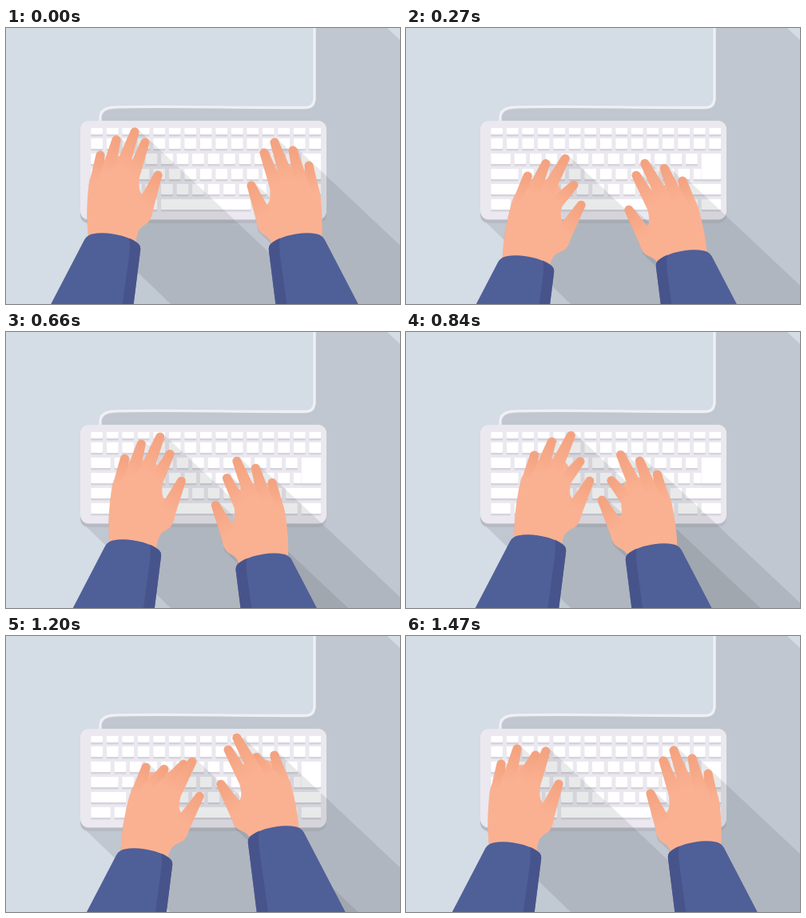
Write an HTML page that moves like this. It is 493x345 px and loops after 1500 ms.

```html
<!DOCTYPE html>
<html lang="en">
<head>
<meta charset="utf-8">
<title>Typing hands</title>
<style>
html, body { margin: 0; width: 100%; height: 100%; overflow: hidden; background: #d4dce5; }
svg { display: block; width: 493px; height: 345px; }
</style>
</head>
<body>
<svg id="stage" viewBox="0 0 493 345" xmlns="http://www.w3.org/2000/svg">
  <defs id="defs"></defs>
  <rect width="493" height="345" fill="#d4dce5"/>
  <path fill="#c1c7d0" d="M386 0V88Q386 100 374 100H132Q118 101 118 116V200L96 239L206 345H493V15L477 0Z"/>
  <path fill="none" stroke="#f0eff4" stroke-width="3.4" d="M386 -3V87Q386 99.500 374 99.500C290 100 200 97 136 99Q118 100 118 112V120"/>
  <rect x="93" y="122" width="308" height="122" rx="10" fill="#b7bac4"/>
  <rect x="93" y="116" width="308" height="123.500" rx="10" fill="#ebe8ef"/>
  <g id="keys"></g>
  <g id="shade" fill="#14161c"></g>
  <g id="hands"></g>
</svg>
<script>
const LOOP = 1500, STEP = 30;
const MIRROR = 497;          // x of the right hand = MIRROR - x
const DIR = [500, 470];      // direction of the cast shadows
const WRIST = [132, 265];
const FOLD = 18;             // how far a pressing fingertip is drawn in

// shared beats of both hands
const BEATS = [
  { at: 0, turn: 0, reach: 0 },
  { at: 270, turn: 0.16, reach: 1 },
  { at: 510, turn: 0, reach: 5 },
  { at: 840, turn: 0.1, reach: 1 },
  { at: 960, turn: 0.04, reach: 4 },
  { at: 1200, turn: 0.16, reach: 3 },
  { at: 1470, turn: 0, reach: 0 }
];
// inward and downward shift at each beat, and the fingers that press
const LEFT = [[0, 0], [17, 28, "index"], [22, 12], [32, -3, "index"],
  [40, 5, "middle"], [40, 9, "ring middle"], [1, 1, "middle"]];
const RIGHT = [[0, 0], [16, 21], [27, 25], [54, 8, "index"],
  [42, -5, "middle"], [26, -19, "ring"], [1, 0]];

// left hand at rest
const FINGERS = [
  { name: "little", tip: [118, 159], base: [113, 196], r: 9 },
  { name: "ring", tip: [138, 140], base: [126, 187], r: 9.5 },
  { name: "middle", tip: [161, 130], base: [142, 184], r: 9.5 },
  { name: "index", tip: [174, 143], base: [157, 189], r: 9 },
  { name: "thumb", tip: [190, 184], base: [173, 226], r: 11 }
];
const PALM = [[104, 295], [103, 262], [101, 238], [102, 212], [104, 190], [112, 172], [128, 163], [145, 159],
  [161, 164], [167, 184], [166, 203], [174, 212], [185, 224], [181, 242], [166, 250], [162, 268], [161, 295]];

const svgNS = "http://www.w3.org/2000/svg";
const byId = id => document.getElementById(id);
function add(parent, tag, attrs) {
  const el = document.createElementNS(svgNS, tag);
  for (const k in attrs) el.setAttribute(k, attrs[k]);
  parent.appendChild(el);
  return el;
}

// every row is 15 units wide
function drawKeys() {
  const unit = 19.5, gap = 4.7, box = byId("keys");
  const row = (y, widths, h = 13, lastH = h) => {
    let x = 106.3;
    widths.forEach((w, i) => {
      const height = i === widths.length - 1 ? lastH : h, width = w * unit - gap;
      add(box, "rect", { x, y: y + 2.5, width, height, rx: 1, fill: "#d6d3dd" });
      add(box, "rect", { x, y, width, height, rx: 1, fill: "#fff" });
      x += w * unit;
    });
  };
  const ends = (w, n) => [w, ...Array(n).fill(1), w];
  row(125, ends(1, 13), 8);
  row(138, ends(1, 13));
  row(176, ends(2, 11));
  row(157, ends(1.5, 12), 13, 32);
  row(195, ends(2.5, 10));
  row(214, [1.5, 1, 2, 6, 1.5, 1.5, 1.5]);
}

// smooth cyclic interpolation that never overshoots a pose
function sample(poses, t) {
  const n = BEATS.length;
  const when = i => BEATS[(i + n) % n].at + LOOP * Math.floor(i / n);
  const pose = i => poses[(i + n) % n];
  let i = n - 1;
  while (BEATS[i].at > t) i--;
  const slope = (j, c) => (pose(j + 1)[c] - pose(j)[c]) / (when(j + 1) - when(j));
  const tangent = (j, c) => {
    const a = slope(j - 1, c), b = slope(j, c);
    return a * b > 0 ? 2 * a * b / (a + b) : 0;
  };
  const d = when(i + 1) - when(i), u = (t - when(i)) / d, v = 1 - u;
  return pose(i).map((p, c) =>
    p * v * v * (1 + 2 * u) + pose(i + 1)[c] * u * u * (3 - 2 * u) +
    d * u * v * (v * tangent(i, c) - u * tangent(i + 1, c)));
}

const pt = p => p[0].toFixed(2) + " " + p[1].toFixed(2);
const poly = pts => "M" + pts.map(pt).join("L") + "Z";
const mid = (a, b) => [(a[0] + b[0]) / 2, (a[1] + b[1]) / 2];
function smooth(pts) {
  const n = pts.length;
  return "M" + pt(mid(pts[n - 1], pts[0])) +
    pts.map((p, i) => "Q" + pt(p) + " " + pt(mid(p, pts[(i + 1) % n]))).join("") + "Z";
}

// tapered finger with rounded ends
function taper(base, tip, r0, r1) {
  const a = Math.atan2(tip[1] - base[1], tip[0] - base[0]), pts = [];
  const arc = (c, r, from) => {
    for (let i = 0; i <= 12; i++) {
      const g = from + i * Math.PI / 12;
      pts.push([c[0] + r * Math.cos(g), c[1] + r * Math.sin(g)]);
    }
  };
  arc(tip, r1, a - Math.PI / 2);
  arc(base, r0, a + Math.PI / 2);
  return pts;
}

// area swept by an outline along DIR
function sweep(pts) {
  const move = p => [p[0] + DIR[0], p[1] + DIR[1]];
  return pts.map((p, i) => {
    const q = pts[(i + 1) % pts.length];
    const flip = (q[0] - p[0]) * DIR[1] < (q[1] - p[1]) * DIR[0];
    const [a, b] = flip ? [q, p] : [p, q];
    return poly([a, b, move(b), move(a)]);
  }).join("");
}

function makeHand(side, moves, mirror, low) {
  const fx = p => mirror ? [MIRROR - p[0], p[1]] : p;
  const poses = moves.map(([x, y, press = ""], i) => [x, y, BEATS[i].turn, BEATS[i].reach - low,
    ...FINGERS.map(f => press.includes(f.name) ? FOLD : 0)]);

  const shade = add(byId("shade"), "path", { opacity: 0.095 });
  const box = add(byId("hands"), "g", {});
  const palm = add(box, "path", { fill: "#fab192" });
  const fingers = FINGERS.map(f => {
    const id = side + f.name;
    const grad = add(byId("defs"), "linearGradient", { id, gradientUnits: "userSpaceOnUse" });
    add(grad, "stop", { offset: 0, "stop-color": "#f4a380" });
    add(grad, "stop", { offset: 0.9, "stop-color": "#fab192" });
    return { ...f, grad, path: add(box, "path", { fill: `url(#${id})` }) };
  });
  const sleeve = add(box, "path", { fill: "#4f5f98" });
  const fold = add(box, "path", { fill: "#445189", opacity: 0.75 });

  return t => {
    const [dx, dy, turn, reach, ...press] = sample(poses, t);
    const sin = Math.sin(turn), cos = Math.cos(turn);
    const place = p => {
      const x = p[0] - WRIST[0], y = p[1] - WRIST[1];
      return [WRIST[0] + dx + x * cos - y * sin, WRIST[1] + dy - reach + x * sin + y * cos];
    };

    const outline = PALM.map(p => fx(place(p)));
    palm.setAttribute("d", smooth(outline));
    let cast = sweep(outline);
    fingers.forEach((f, i) => {
      const [x, y] = place(f.tip);
      const a = fx(place(f.base)), b = fx([x, y + press[i]]);
      const pts = taper(a, b, f.r, 5.5);
      f.path.setAttribute("d", poly(pts));
      [["x1", b[0]], ["y1", b[1]], ["x2", a[0]], ["y2", a[1]]].forEach(([k, v]) => f.grad.setAttribute(k, v));
      cast += sweep(pts);
    });

    const at = (x, y) => pt(fx([x + dx, y + dy]));
    const corner = `Q${at(169, 273)} ${at(168, 279)}L${at(149, 430)}`;
    sleeve.setAttribute("d", `M${at(12, 430)}L${at(98, 265)}Q${at(101, 259)} ${at(108, 257.5)}` +
      `Q${at(124, 254)} ${at(146, 260)}Q${at(160, 264.5)} ${at(166, 270)}${corner}Z`);
    fold.setAttribute("d", `M${at(154, 262.5)}Q${at(162, 266)} ${at(166, 270)}${corner}` +
      `L${at(134, 430)}L${at(154, 285)}Q${at(156, 270)} ${at(154, 262.5)}Z`);
    const cuff = [[12, 430], [100, 261], [124, 256], [167, 272], [149, 430]];
    shade.setAttribute("d", cast + sweep(cuff.map(p => fx([p[0] + dx, p[1] + dy]))));
  };
}

drawKeys();
const hands = [makeHand("left", LEFT, false, 0), makeHand("right", RIGHT, true, 13)];
const start = performance.now();
function tick() {
  const t = Math.floor((performance.now() - start) % LOOP / STEP) * STEP;
  hands.forEach(draw => draw(t));
  requestAnimationFrame(tick);
}
tick();
</script>
</body>
</html>
```
